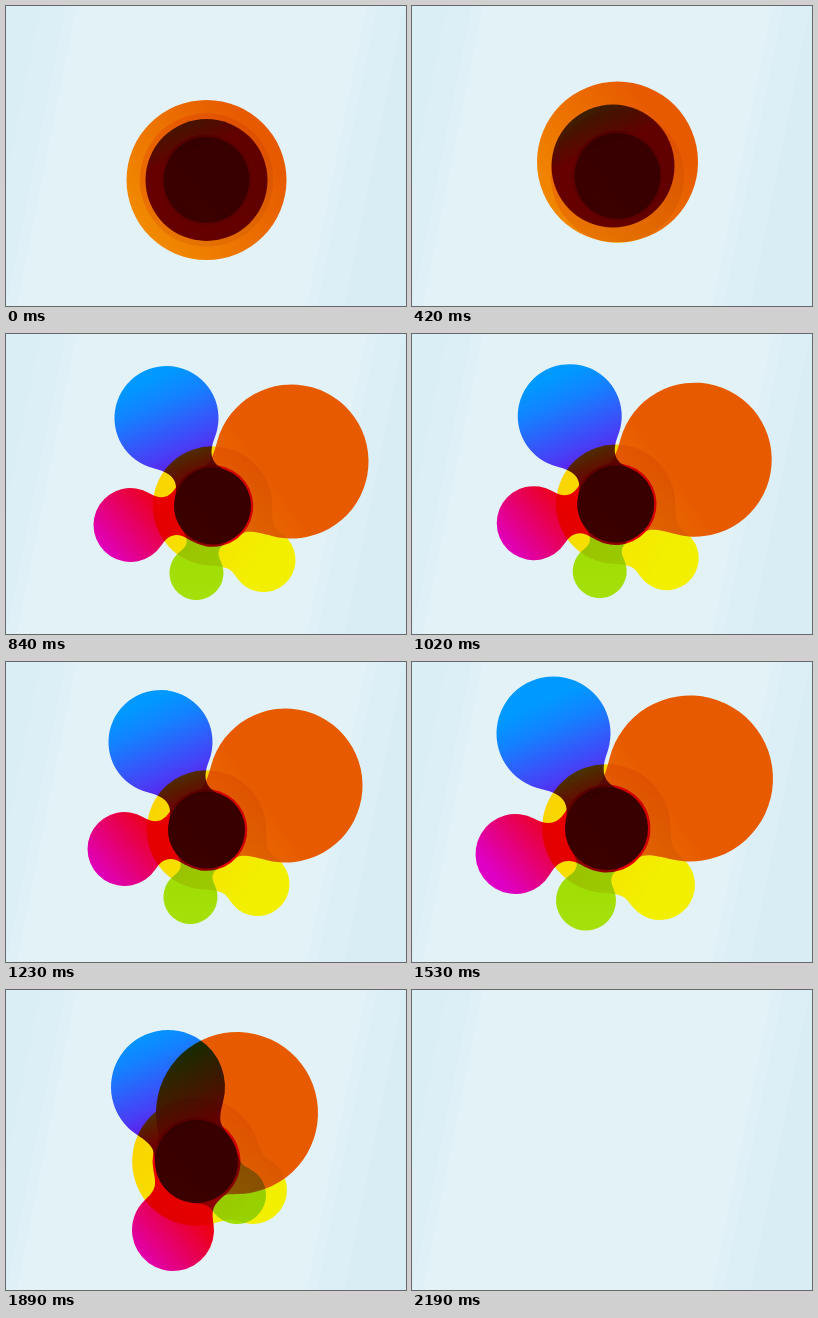
Write an HTML page with a canvas that moves like this. It is 400 by 300 pixels and loops after 2520 ms.

```html
<!DOCTYPE html>
<html lang="en">
<head>
<meta charset="utf-8">
<title>Colour blobs</title>
<style>
  html, body { margin: 0; width: 100%; height: 100%; overflow: hidden; }
  body {
    background: linear-gradient(101.3deg,
      #d9eef5 35px, #dceff6 35px 59px, #dff1f7 59px 69px, #e3f2f7 70px 353px,
      #dff1f7 354px 364px, #dceff6 364px 390px, #d9edf5 391px);
  }
  canvas { display: block; }
</style>
</head>
<body>
<canvas id="stage" width="400" height="300"></canvas>
<script>
const ctx = document.getElementById('stage').getContext('2d');
const LOOP = 2520, STEP = 30, END = 2190;

const linear = p => p;
const easeIn = p => p * p;
const easeInOut = p => p * p * (3 - 2 * p);
const mix = (a, b, p) => a + (b - a) * p;
const mixAll = (a, b, p) => a.map((v, i) => mix(v, b[i], p));

// Core track: time, [x, y, core radius, scale, spread], pose, easing to the next key
const IDLE = 0, LEAN = 1, OPEN = 2, WIDE = 3, SWING = 4;
const keys = [
  [0,    [200.5, 174, 43, 1, 1],       IDLE,  easeIn],
  [420,  [205.5, 170, 43, 1, 1],       LEAN,  easeInOut],
  [660,  [207, 175, 39, 1, 1.08],      OPEN,  easeInOut],
  [840,  [206.5, 172, 38.5, 1, 1],     OPEN,  linear],
  [1230, [200.5, 168, 38.5, 1, 1],     OPEN,  easeInOut],
  [1530, [194.5, 166.5, 41.5, 1, 1],   WIDE,  linear],
  [1620, [193, 166, 41.5, 1, 1.01],    WIDE,  easeInOut],
  [1890, [190.5, 171.5, 41.5, 1, 1],   SWING, easeIn],
  [END,  [188.5, 170, 41.5, 0, 0],     SWING, linear]
];

// body: core size factor; axis and stops: gradient relative to the core;
// poses: satellite [dx, dy, radius]
const blobs = [
  { body: 1.55, axis: [-60, -20, 55, 50],
    stops: [[0, '#fad400'], [1, '#f2f000']],
    poses: [[0, 0, 30], [2, 2, 30], [51, 54, 32], [53.5, 56.5, 35], [56.5, 28.5, 34]] },
  { body: 1, axis: [0, 0, 0, 100],
    stops: [[0, '#9cdc00'], [1, '#a5e00a']],
    poses: [[0, 0, 27], [-1, 3, 27], [-16, 67, 27], [-20.5, 72, 30], [40.5, 33.5, 29]] },
  { body: 1.06, axis: [-22, 20, -86, 76],
    stops: [[0, '#ee000a'], [1, '#de00c4']],
    poses: [[0, 0, 40], [-2, 2, 40], [-82, 19, 37], [-91, 25.5, 40], [-23.5, 68.5, 41]] },
  { body: 1, axis: [-55, -130, -12, -28],
    stops: [[0, '#0099ff'], [0.25, '#1580ff'], [0.7, '#4a3cf6'], [1, '#7000e0']],
    poses: [[0, 0, 61], [-4.5, -10, 61.5], [-46, -88, 52], [-53, -95, 57], [-28.5, -74.5, 57]] },
  { body: 1, axis: [-75, 45, 50, -45],
    stops: [[0, '#f28c00'], [1, '#e75a00']],
    poses: [[0, 0, 80], [0, -14, 80.5], [79, -44.5, 77], [83.5, -50, 83], [40.5, -48.5, 81]] }
];

// Outline of a core circle (at the origin) joined to a satellite by a smooth neck
function tracePair(r, x, y, q) {
  const d = Math.hypot(x, y), dir = Math.atan2(y, x), v = 0.5;
  ctx.beginPath();
  if (d <= Math.abs(r - q) + 0.01) {
    if (r > q) ctx.arc(0, 0, r, 0, 7);
    else ctx.arc(x, y, q, 0, 7);
    return;
  }
  const cut = (a, b) => d < r + q ? Math.acos((a * a + d * d - b * b) / (2 * a * d)) : 0;
  const u = cut(r, q), w = cut(q, r), tangent = Math.acos((r - q) / d);
  const a = mix(u, tangent, v), b = mix(Math.PI - w, tangent, v);
  const at = (cx, cy, len, ang) => [cx + len * Math.cos(ang), cy + len * Math.sin(ang)];
  const ends = side => [at(0, 0, r, dir + side * a), at(x, y, q, dir + side * b)];
  const [p1, p2] = ends(-1), [p4, p3] = ends(1);
  const gap = Math.hypot(p2[0] - p1[0], p2[1] - p1[1]) / (r + q);
  const pull = Math.min(1.2, gap) * Math.min(1, 2 * d / (r + q));
  const quarter = Math.PI / 2;

  ctx.arc(0, 0, r, dir + a, dir - a);
  ctx.bezierCurveTo(...at(...p1, r * pull, dir - a + quarter),
                    ...at(...p2, q * pull, dir - b - quarter), ...p2);
  ctx.arc(x, y, q, dir - b, dir + b);
  ctx.bezierCurveTo(...at(...p3, q * pull, dir + b + quarter),
                    ...at(...p4, r * pull, dir + a - quarter), ...p4);
  ctx.closePath();
}

function draw(t) {
  ctx.setTransform(1, 0, 0, 1, 0, 0);
  ctx.clearRect(0, 0, 400, 300);
  if (t >= END) return;
  const i = keys.findIndex(k => k[0] > t) - 1;
  const [t0, core0, pose0, ease] = keys[i], [t1, core1, pose1] = keys[i + 1];
  const p = ease((t - t0) / (t1 - t0));
  const [x, y, r, scale, spread] = mixAll(core0, core1, p);

  ctx.setTransform(scale, 0, 0, scale, x, y);
  ctx.globalCompositeOperation = 'multiply';
  for (const { body, axis, stops, poses } of blobs) {
    const [dx, dy, q] = mixAll(poses[pose0], poses[pose1], p);
    const fill = ctx.createLinearGradient(...axis);
    stops.forEach(s => fill.addColorStop(...s));
    ctx.fillStyle = fill;
    tracePair(r * body, dx * spread, dy * spread, q);
    ctx.fill();
  }
}

const start = performance.now();
function frame() {
  const t = (performance.now() - start) % LOOP;
  draw(Math.floor(t / STEP) * STEP);
  requestAnimationFrame(frame);
}
frame();
</script>
</body>
</html>
```
